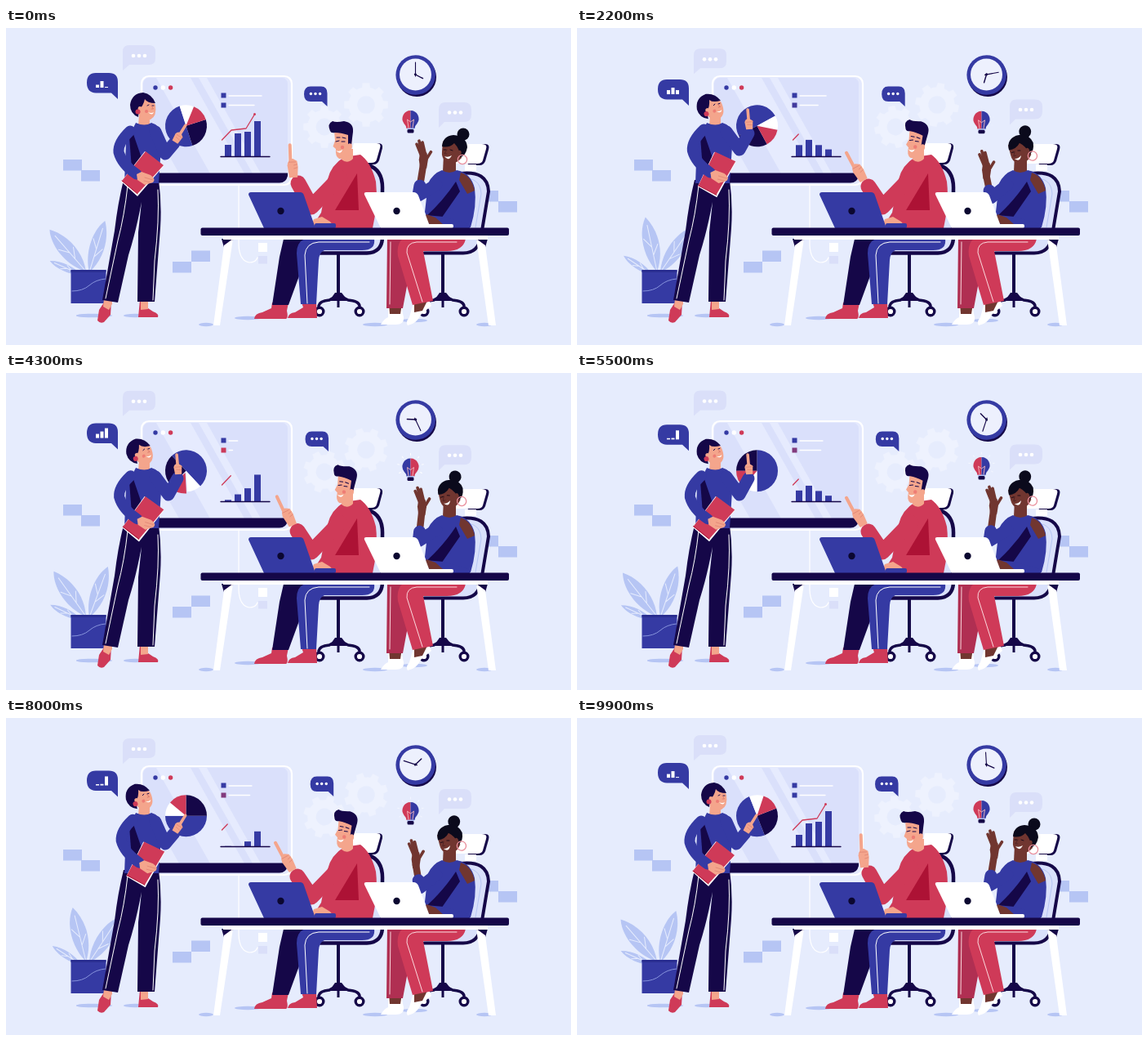
Write an HTML page that moves like this. It is 692x388 px and loops after 10 s.

```html
<!DOCTYPE html>
<html lang="en">
<head>
<meta charset="utf-8">
<title>Team presentation</title>
<style>
html,body{margin:0;width:100%;height:100%;overflow:hidden;background:#e6ecfd}
svg{display:block;width:100vw;height:100vh}
</style>
</head>
<body>
<svg id="stage" viewBox="0 0 692 388"></svg>
<script>
const BLUE = '#353aa3', NAVY = '#150748', RED = '#cf3a58', WINE = '#ad1235',
  SKIN = '#f4a58c', BROWN = '#713630', PALE = '#b6c5f4', MIST = '#dadff9', WHITE = '#fff';
const LOOP = 10000;

// Markup helpers
const fill = (d, color, extra = '') => `<path d="${d}" fill="${color}" ${extra}/>`;
const line = (d, color, width = 1, extra = '') =>
  `<path d="${d}" fill="none" stroke="${color}" stroke-width="${width}" stroke-linecap="round" stroke-linejoin="round" ${extra}/>`;
const rect = (x, y, w, h, color, extra = '') =>
  `<rect x="${x}" y="${y}" width="${w}" height="${h}" fill="${color}" ${extra}/>`;
const dot = (x, y, r, color, extra = '') => `<circle cx="${x}" cy="${y}" r="${r}" fill="${color}" ${extra}/>`;
const oval = (x, y, rx, ry, color) => `<ellipse cx="${x}" cy="${y}" rx="${rx}" ry="${ry}" fill="${color}"/>`;
const group = (id, ...parts) => `<g id="${id}">${parts.join('')}</g>`;
const dots = (x, y, gap, r) => [-1, 0, 1].map(i => dot(x + i * gap, y, r, WHITE)).join('');

function wedge(id, from, to, color) {
  const at = a => `${25.5 * Math.sin(a * Math.PI / 180)} ${-25.5 * Math.cos(a * Math.PI / 180)}`;
  return fill(`M0 0L${at(from)}A25.5 25.5 0 0 1 ${at(to)}Z`, color, `id="${id}"`);
}

function gear(id, r) {
  const teeth = 8, points = [];
  for (let i = 0; i < teeth; i++) {
    [[-.5, .8], [-.3, .8], [-.2, 1], [.2, 1], [.3, .8]].forEach(([k, s]) => {
      const a = (i + k) * 2 * Math.PI / teeth;
      points.push(`${(r * s * Math.cos(a)).toFixed(1)} ${(r * s * Math.sin(a)).toFixed(1)}`);
    });
  }
  const h = r * .4;
  const hole = `M${h} 0A${h} ${h} 0 1 0 ${-h} 0A${h} ${h} 0 1 0 ${h} 0Z`;
  return group(id, fill(`M${points.join('L')}Z${hole}`, '#eef2fe', 'fill-rule="evenodd"'));
}

const leaf = (id, len, w) => group(id,
  fill(`M0 0C${-w} ${-len * .3} ${-w} ${-len * .75} 0 ${-len}C${w} ${-len * .7} ${w} ${-len * .3} 0 0Z`, PALE),
  line(`M0 0V${-len * .85}M0 ${-len * .3}L${w * .6} ${-len * .48}M0 ${-len * .45}L${-w * .6} ${-len * .62}`, '#e6ecfd', 1));

const chairBase = x =>
  rect(x - 2, 276, 4, 52, NAVY) +
  line(`M${x - 24} 340Q${x - 23} 334 ${x - 11} 333L${x} 327L${x + 12} 333Q${x + 25} 334 ${x + 26} 340`, NAVY, 3.6) +
  fill(`M${x - 11} 334L${x - 4} 324H${x + 4}L${x + 12} 334Z`, NAVY) + rect(x - 1.5, 334, 3, 8, NAVY) +
  [-23, 26].map(k => dot(x + k, 347, 4.8, WHITE, `stroke="${NAVY}" stroke-width="3.4"`)).join('');

const shadow = (x, y, rx) => oval(x, y, rx, 2.2, PALE);

const BAR = [[268, 14], [280, 28], [292, 30], [304, 43]];
const TAG = [[110, 5], [115.5, 8], [121, 12]];

const backdrop =
  [[70, 161], [92, 174], [204, 286], [227, 272.5], [580, 199], [603, 212]]
    .map(([x, y]) => rect(x, y, 23, 13.5, PALE)).join('') +
  gear('gearA', 26) + gear('gearB', 27) +
  line('M285 192V266Q286 285 298 287Q306 287 308 281', WHITE, 1.2) +
  rect(309, 263, 11, 11, WHITE) + rect(309, 279, 11, 9.5, MIST);

const board =
  rect(166, 59, 184, 133, '#e4e9fd', 'rx="9"') +
  `<clipPath id="screen"><rect x="168" y="61" width="177" height="118" rx="7"/></clipPath>` +
  `<g clip-path="url(#screen)">` +
  rect(168, 61, 177, 118, '#dae0fb') +
  fill('M184 61H226L292 178H250ZM236 61H246L312 178H302ZM168 100L212 178H168Z', '#e6ebfe') + '</g>' +
  rect(166, 59, 184, 133, 'none', 'rx="9" stroke="#fff" stroke-width="2.2"') +
  fill('M171 177.500H345V181Q343 189.500 335 189.500H176Q171 189.500 171 184Z', NAVY) +
  [BLUE, WHITE, RED].map((c, i) => dot(183 + i * 9.3, 73, 2.7, c)).join('') +
  rect(263.5, 79.500, 6, 6, BLUE, 'id="keyA"') + rect(263.5, 91.500, 6, 6, BLUE, 'id="keyB"') +
  line('M273 83H313', WHITE, 1.4, 'id="textA" pathLength="1"') +
  line('M273 94.500H304', WHITE, 1.4, 'id="textB" pathLength="1"') +
  BAR.map(([x], i) => rect(x, 157, 8, 0, BLUE, `id="bar${i}"`)).join('') +
  line('M263 157.500H323', NAVY, 1.4) +
  line('M264.500 137L276 125L294 123L304 106.500', RED, 1.3, 'id="trend" pathLength="1"') +
  dot(304.5, 105.5, 1.5, RED, 'id="peak"') +
  group('pie', wedge('pieBlue', 162, 342, BLUE), wedge('pieNavy', 72, 162, NAVY),
    wedge('pieWhite', -18, 22, WHITE), wedge('pieRed', 22, 72, RED));

const bubbles =
  group('noteA', fill('M151 21H175Q183 21 183 29V37Q183 45 175 45H151L143 52V29Q143 21 151 21Z', MIST), dots(163, 34, 7, 2.3)) +
  group('noteB', fill('M110 55H126Q137 55 137 66V87L129 79.500H110Q99 79 99 67Q99 55 110 55Z', BLUE),
    TAG.map(([x], i) => rect(x, 73, 4, 0, WHITE, `id="tag${i}"`)).join('')) +
  group('noteC', fill('M373 71.500H386Q393.500 71.500 393.500 80V96L387 90H373Q365 90 365 81Q365 71.500 373 71.500Z', BLUE), dots(379, 80.5, 5.6, 1.7)) +
  group('noteD', fill('M538 91H561Q570 91 570 100V106Q570 115 561 115H537L530 122V100Q530 91 538 91Z', MIST), dots(550, 103.5, 7, 2.3));

const clock =
  dot(503, 60, 24, NAVY) + dot(501.7, 57.5, 24.3, BLUE) + dot(501.5, 57, 19.5, '#edf0fd') +
  group('hands', line('M0 2V-15', NAVY, 1.1), line('M-1 -.5L9 4.700', NAVY, 1.4)) + dot(501.5, 57, 1.4, NAVY);

const bulb = group('bulb',
  fill('M0 -10A10 10 0 0 0 -8 6Q-5 9 -5 12H0Z', BLUE, 'id="bulbL"') +
  fill('M0 -10A10 10 0 0 1 8 6Q5 9 5 12H0Z', RED, 'id="bulbR"') +
  line('M-2.500 11L-4 1L0 4L4 1L2.500 11', '#f7b9bd', .9) +
  rect(-4.5, 11.5, 9, 2, PALE) + rect(-4, 13, 8, 4.5, NAVY, 'rx="1.5"') +
  group('rays', [-120, -80, -40, 0, 40, 80, 120].map(a => line('M0 -14V-16', WHITE, 1, `transform="rotate(${a})"`)).join('')));

const plant =
  shadow(101, 352, 15) + leaf('leafR', 66, 12) + leaf('leafL', 68, 13) + leaf('leafS', 42, 6) +
  rect(79.5, 296, 43, 41, BLUE) + rect(79.5, 296, 43, 3, '#2a2e91') +
  line('M81 322Q94 322 102 315T122 307', '#8793dc', 1);

const speaker =
  shadow(108, 352, 22) + shadow(158, 352, 14) +
  fill('M122 333L114 345L112 358Q115 362 120 360L128 351L129 334Z', RED) +
  fill('M164 333L162 354H186Q188 350 180 347L174 343L173 333Z', RED) +
  fill('M120 331H130V338L126 345L119 341ZM165 331H174V344L165 345Z', SKIN) +
  fill('M144 186H187Q191 215 189 245L182 335H161L162 250L166 213Q159 250 150 278L137 336L118 333L133 248Q137 214 144 186Z', NAVY) +
  line('M149 193Q145 230 137 260L122 331M186 198Q188 235 182 285L180 333', WHITE, 1) +
  fill('M163 106H176V120L170 124L162 120Z', SKIN) +
  fill('M159 116Q170 121 178 116Q189 119 191 130L187 190H145L147 140Z', BLUE) +
  fill('M151 133L156 130L167 162L154 172Z', NAVY) +
  group('headA',
    fill('M162 87Q178 83 183 94Q185 108 177 112Q166 114 161 103Z', SKIN) +
    fill('M183 92Q173 92 170 87Q168 96 163 99L162 109Q152 105 152 94Q154 80 168 79Q179 81 183 92Z', NAVY) +
    oval(164, 99, 2.4, 3, SKIN) + dot(161.5, 102.5, 3, RED) + dot(172, 102, 2, '#ee7d75') +
    line('M173 95L175 94M179 95L181 95', NAVY, .9) +
    line('M178 95L180.500 99H178', '#d97568', .8) + fill('M174 103Q178 105 181 103Q179 108 174 103Z', WHITE)) +
  line('', BLUE, 15, 'id="armA"') +
  group('pointA', fill('M-4 2L-5 -7Q-4 -12 1 -11L5 -8L4 2Z', SKIN) + line('M0 -8L0 -22', SKIN, 3.6) + line('M-3 -7L5 -7M-2 -4L4 -3', '#db7f70', .6)) +
  group('folder', fill('M170 151L193 169L161 206L141 188Z', WHITE), fill('M171 151L193 168L161 203L142 187Z', RED),
    line('M142 187L161 203', WINE, 1)) +
  group('armB', line('M152 126Q137 140 138 152Q142 167 160 179', BLUE, 13),
    fill('M160 179L166 176L177 180Q184 185 180 189L170 192L161 186Z', SKIN), line('M170 183L180 186M169 187L177 189', '#db7f70', .7));

const chairMan =
  fill('M444 168Q462 174 461 198V257Q460 275 442 275H384L400 255Z', '#d9e0fb') +
  line('M444 168Q462 174 461 198V257Q460 275 442 275.500H385', NAVY, 4.5) +
  fill('M434 141H456Q462 141 461 147L457 162Q455 167 450 167H436Z', NAVY) +
  fill('M426 141H454Q460 141 458 147L454 161Q453 165 447 165H420Z', WHITE) + chairBase(407);

const man =
  shadow(296, 355, 16) +
  fill('M326 336H346L344 346Q346 355 343 356H304Q305 349 314 348L325 343Z', RED) +
  fill('M362 336H380L381 355H345Q346 349 354 348L364 342Z', RED) +
  fill('M341 254H385L364 290L346 339H326L335 280Z', NAVY) +
  fill('M366 258H451Q453 272 436 272H390Q384 274 383 284L380 338H361L356 276Q356 262 366 258Z', BLUE) +
  line('M445 262H383Q367 263 366 278L369 337', WHITE, 1) +
  fill('M414 158L434 155Q447 164 453 188Q456 214 449 245H374L386 226L394 185Q398 168 414 158Z', RED) +
  fill('M430 178L432 223H403Z', WINE) +
  fill('M412 148H425V160Q418 167 411 161Z', SKIN) +
  group('headM',
    fill('M402 126H424L423 151Q418 161 408 160Q403 157 404 148L400.500 145L403 138Z', SKIN) +
    fill('M397 126Q393 117 400 114Q404 116 414 114Q426 116 425 127L423 143H419V131Q410 128 403 128Q398 129 397 126Z', NAVY) +
    oval(421, 145, 2.8, 3.8, SKIN) + line('M404 139L408 138M411 139L415 139', NAVY, 1) +
    line('M405 134H409M412 134L416 135', NAVY, 1) + dot(412, 146, 2.2, '#ee7d75') +
    fill('M404 150Q408 152 412 149Q410 156 404 150Z', WHITE)) +
  line('', RED, 19, 'id="armM"') +
  group('pointM', fill('M-5 3L-7 -12Q-6 -20 0 -20L5 -17L6 -10L5 3Z', SKIN) + line('M-3 -16L-3 -37', SKIN, 4) +
    line('M-5 -16H3M1 -12L5 -13M1 -8L5 -9', '#db7f70', .7)) +
  fill('M392 226L408 234L402 245H373L378 236Z', RED) + fill('M377 234L387 231L397 237L401 242H374Z', SKIN);

const chairWoman =
  fill('M553 178Q590 174 591 200L582 254Q579 275 560 275H512L540 250Z', '#d9e0fb') +
  line('M556 178Q590 174 591 200L582 254Q579 275.500 560 275.500H512', NAVY, 4) +
  line('M558 184Q581 182 582 203L575 244', PALE, 1) +
  fill('M563 142H587Q593 142 591 149L587 163Q585 168 580 168H566Z', NAVY) +
  fill('M556 142H583Q590 142 588 148L584 162Q583 166 577 166H550Z', WHITE) +
  rect(562, 167, 14, 8, WHITE) + chairBase(535);

const woman =
  shadow(452, 363, 15) + shadow(500, 358, 16) +
  fill('M468 339L484 340L487 354Q488 363 477 363H459Q463 356 468 354Z', WHITE) +
  fill('M500 333H518L521 340L508 351Q503 362 492 364Q489 360 494 354Z', WHITE) +
  fill('M469 337H485L483 350H470ZM500 330H518L510 346L500 348Z', BROWN) +
  fill('M467 254H510L494 300L486 343H466Z', '#b02f52') +
  fill('M486 258H563Q560 273 540 273H511L523 334L498 339L480 279Q478 264 486 258Z', RED) +
  line('M552 262H503Q490 263 491 275L510 335M471 262L470 338', '#fbd8dd', 1) +
  fill('M536 155H551V176L543 181L535 176Z', BROWN) +
  fill('M534 174Q543 180 552 174Q569 177 574 196Q577 218 569 244H519L513 225L517 190Q523 178 534 174Z', BLUE) +
  fill('M557 177Q570 181 574 199L565 203L555 186Z', BROWN) +
  fill('M551 188L556 200L531 236L513 232Q536 211 551 188Z', NAVY) +
  group('headW',
    dot(560, 130, 7.5, '#0b0a1c') +
    fill('M535 139Q548 131 559 139L558 159Q549 169 539 164Q533 159 534 151Z', BROWN) +
    fill('M534 145Q535 132 548 131Q564 132 565 146Q563 157 556 158Q556 148 549 141Q543 147 534 145Z', '#0b0a1c') +
    oval(555.5, 153, 2.2, 3.3, BROWN) + dot(559, 161, 5.6, 'none', 'stroke="#e98f9c" stroke-width="1.3"') +
    line('M536 149H539M544 149L547 150', '#200c18', 1) + line('M540 149L537 154H540', '#4d2223', .8) +
    fill('M537 157Q541 159 546 156Q542 164 537 157Z', WHITE)) +
  line('', BROWN, 8.5, 'id="foreW"') + line('', BLUE, 15, 'id="armW"') +
  group('wave', fill('M-4 4L-5 -7L-3 -17L5 -15L6 -6L4 4Z', BROWN) +
    line('M-2 -12L-7 -26M0 -13L-4 -30M3 -13L0 -28M4 -7L10 -16', BROWN, 3.6)) +
  fill('M514 229L536 231L568 240V245H517Z', BLUE) + fill('M515 228L526 232L535 240H519L512 235Z', BROWN);

const desk =
  shadow(245, 363, 9) + shadow(586, 363, 10) +
  fill('M264 258H279L268 272ZM575 258H590L586 272Z', NAVY) +
  fill('M266 254H590V259H266ZM267 266L278 258L262 364H254ZM576 258L587 266L600 364H591Z', WHITE) +
  rect(378, 239, 26, 6, BLUE, 'rx="2"') +
  fill('M300 201H360Q364 201 365 205L379 245H316L297 204Q297 201 300 201Z', BLUE) + dot(336.5, 224, 4.2, '#0b0730') +
  rect(515, 240, 33, 5, WHITE, 'rx="2"') +
  fill('M441 201H499Q503 201 505 205L520 245H459L439 204Q438 201 441 201Z', WHITE) + dot(478.5, 224, 4.2, '#0b0730') +
  rect(238.5, 244.5, 377.5, 9.5, NAVY, 'rx="2"');

const stage = document.getElementById('stage');
stage.innerHTML = rect(0, 0, 692, 388, '#e6ecfd') + backdrop + board + bubbles + clock + bulb + plant + speaker +
  chairMan + chairWoman + man + woman + desk;

const parts = {};
stage.querySelectorAll('[id]').forEach(el => parts[el.id] = el);
const set = (id, name, value) => parts[id].setAttribute(name, value);
const place = (id, x, y, angle = 0) => set(id, 'transform', `translate(${x} ${y}) rotate(${angle})`);
const turn = (id, angle, x, y) => set(id, 'transform', `rotate(${angle} ${x} ${y})`);

// Motion helpers
const clamp = v => Math.min(1, Math.max(0, v));
const ramp = (t, from, to) => clamp((t - from) / (to - from));
const ease = v => v * v * (3 - 2 * v);
const mix = (a, b, k) => a + (b - a) * k;
const mixPoint = (a, b, k) => a.map((v, i) => mix(v, b[i], k));
const swing = (t, period) => (1 - Math.cos(2 * Math.PI * t / period)) / 2;
const blend = (a, b, k) => {
  const rgb = c => [1, 3, 5].map(i => parseInt(c.slice(i, i + 2), 16));
  return `rgb(${mixPoint(rgb(a), rgb(b), k).map(Math.round)})`;
};
function reveal(id, amount) {
  set(id, 'stroke-dasharray', `${amount} 2`);
  set(id, 'opacity', amount > .01 ? 1 : 0);
}

function drawChart(beat) {
  BAR.forEach(([, full], i) => {
    const fall = 1 - ramp(beat, [0, .2, .45, .7][i], [1.1, 1.3, 1.55, 1.8][i]);
    const start = 1.32 + i * .235;
    const h = full * Math.max(fall, ramp(beat, start, start + .9));
    set('bar' + i, 'y', 157 - h);
    set('bar' + i, 'height', h);
  });
  const trend = Math.max(1 - .82 * ramp(beat, .1, 1.1), .18 + .82 * ramp(beat, 2.2, 3.1));
  reveal('trend', trend);
  set('peak', 'opacity', trend > .98 ? 1 : 0);
}

function drawFlashes(beat) {
  const swap = Math.min(ease(ramp(beat, .25, .75)), 1 - ease(ramp(beat, 1.75, 2.3)));
  const lit = beat > .6 && beat < 2;
  set('keyB', 'fill', blend(BLUE, RED, swap));
  set('bulbL', 'fill', lit ? BLUE : RED);
  set('bulbR', 'fill', lit ? RED : BLUE);
  set('rays', 'opacity', swap);
  reveal('textA', Math.max(1 - ramp(beat, .2, 1.2), ramp(beat, 1.6, 2.35)));
  reveal('textB', Math.max(1 - ramp(beat, .3, 1.45), ramp(beat, 1.7, 2.4)));
  place('bulb', 495.5, 111 + 6 * swing(beat, 2.5));
  const pop = 5 * ease(clamp((swing(beat, 2.5) - .35) / .5));
  place('pieRed', pop * .73, -pop * .68);
  TAG.forEach(([, full], i) => {
    const d = Math.abs(beat - [.35, .62, 2.45][i]);
    const h = full * clamp(Math.min(d, 2.5 - d) / [.5, .55, .6][i]);
    set('tag' + i, 'y', 73 - h);
    set('tag' + i, 'height', h);
  });
}

function drawPeople(t, nod, sway) {
  turn('headA', -17 * nod, 169, 114);
  turn('headM', 9 * nod, 416, 160);
  turn('headW', -19 * nod, 545, 162);

  const up = ease(ramp(t, 0, 1.1)) - ease(ramp(t, 6.6, 7.9));
  const elbow = mixPoint([195, 154], [199, 149], up), wrist = mixPoint([206, 141], [210, 129], up);
  set('armA', 'd', `M183 127L${elbow}L${wrist}`);
  place('pointA', ...mixPoint([208, 138], [211, 122], up), mix(32, -5, up));
  turn('folder', -13 * sway, 172, 160);
  place('armB', 3.5 * sway, -2 * sway);

  const cuff = mixPoint([358, 190], [357, 194], nod);
  set('armM', 'd', `M409 183L374 219L${cuff}`);
  place('pointM', ...mixPoint([352, 180], [350, 184], nod), mix(-2, -28, nod));

  const hand = mixPoint([511, 168], [501, 181], sway), bend = mixPoint([505, 205], [507, 208], sway);
  set('foreW', 'd', `M${bend}L${hand}`);
  set('armW', 'd', `M527 192L${bend}L${mixPoint(bend, hand, .32)}`);
  place('wave', ...hand, mix(-2, -3, sway));
}

function draw(ms) {
  const t = ms / 1000, third = t % (LOOP / 3000);
  const sway = swing(t, 5), bob = swing(t, 10 / 3), spin = 36 * t;
  const nod = ease(clamp((bob - .15) / .6));

  place('gearA', 390, 121, spin);
  place('gearB', 441, 94, -spin);
  place('hands', 501.5, 57, spin);
  place('pie', 220.5, 119.8, spin);

  place('noteA', 0, 4.5 * sway);
  place('noteB', 0, 10.5 * bob);
  place('noteC', 8.5 * sway, 0);
  place('noteD', 0, -4.5 * bob);

  place('leafL', 98, 298, -41 + 30 * sway);
  place('leafR', 102, 299, 17 + 18 * sway);
  place('leafS', 92, 302, -66 + 10 * sway);

  drawChart(third);
  drawFlashes(t % 2.5);
  drawPeople(t, nod, sway);
}

const begin = performance.now();
function tick() {
  draw((performance.now() - begin) % LOOP);
  requestAnimationFrame(tick);
}
tick();
</script>
</body>
</html>
```
